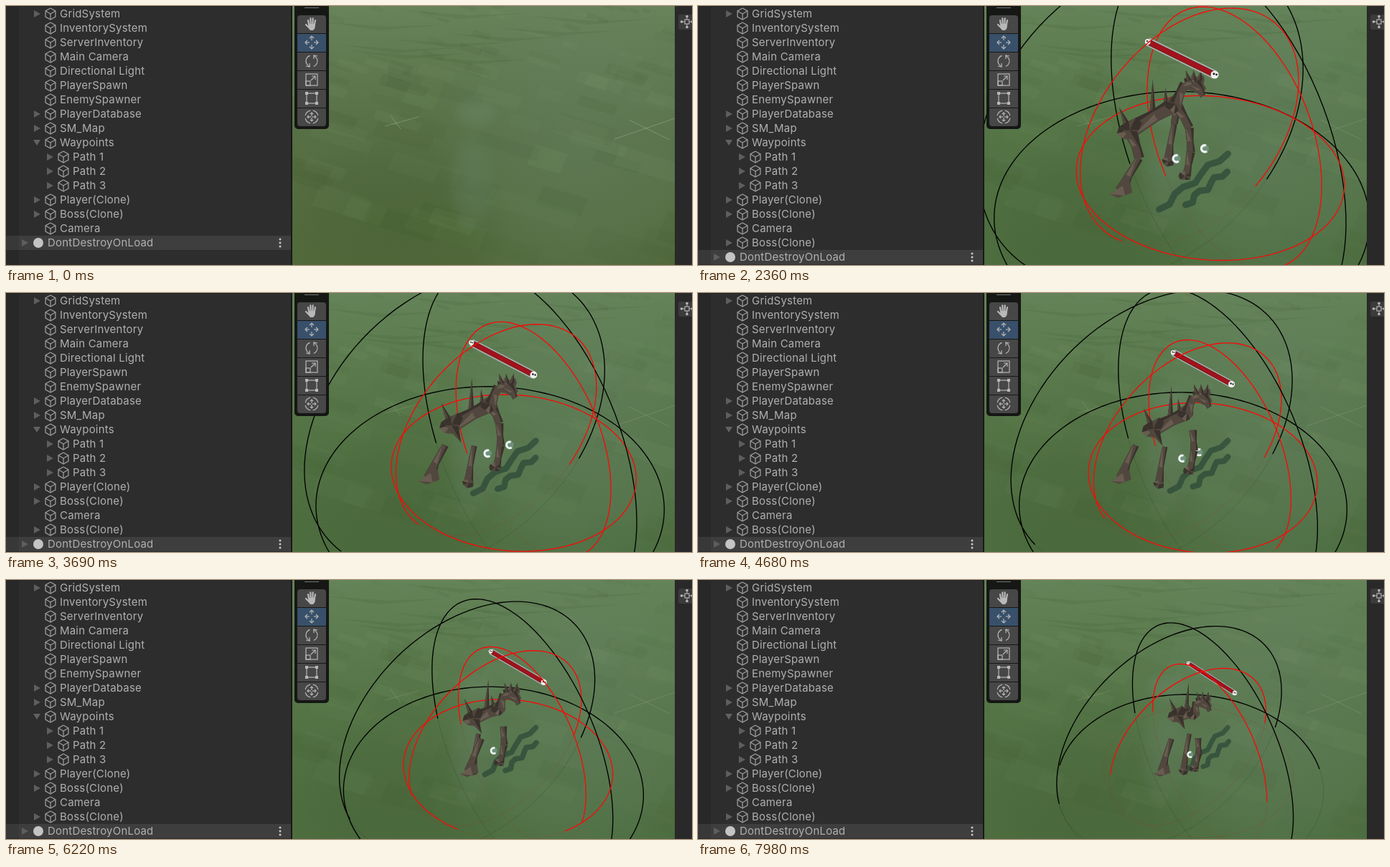
An HTML page with a canvas that plays this animation: 956 px wide and 362 px high, repeating every 8000 ms.

```html
<!DOCTYPE html>
<html lang="en">
<head>
<meta charset="utf-8">
<title>Scene view</title>
<style>
html, body { margin: 0; width: 100%; height: 100%; overflow: hidden; background: #2d2d2d; }
canvas { display: block; width: 956px; height: 362px; }
</style>
</head>
<body>
<canvas id="stage" width="956" height="362"></canvas>
<script>
const W = 956, H = 362, LOOP = 8000, SPAWN = 1460, STEP = 70.2;
const VIEW = { x: 399, w: 533 };
const stage = document.getElementById('stage').getContext('2d');
let g = stage;

// ---------- helpers ----------
function path(pts, close) {
  g.beginPath();
  pts.forEach((p, i) => i ? g.lineTo(p[0], p[1]) : g.moveTo(p[0], p[1]));
  if (close) g.closePath();
}
function poly(color, ...pts) { g.fillStyle = color; path(pts, true); g.fill(); }
function line(color, width, ...pts) {
  g.strokeStyle = color; g.lineWidth = width; path(pts); g.stroke();
}
function box(color, x, y, w, h, r = 0) {
  g.fillStyle = color; g.beginPath(); g.roundRect(x, y, w, h, r); g.fill();
}
function disc(color, x, y, r) {
  g.fillStyle = color; g.beginPath(); g.arc(x, y, r, 0, 7); g.fill();
}
function arc(color, width, x, y, r, a, b) {
  g.strokeStyle = color; g.lineWidth = width;
  g.beginPath(); g.arc(x, y, r, a, b); g.stroke();
}
function layer(draw) {
  const c = document.createElement('canvas');
  c.width = W; c.height = H;
  g = c.getContext('2d');
  draw();
  g = stage;
  return c;
}
function random(seed) {
  return () => (seed = (seed * 16807) % 2147483647) / 2147483647;
}
const mix = (a, b, u) => a + (b - a) * u;
const mid = (a, b, u = 0.5) => [mix(a[0], b[0], u), mix(a[1], b[1], u)];
const off = (p, x, y) => [p[0] + x, p[1] + y];
const smooth = u => (u = Math.min(1, Math.max(0, u))) * u * (3 - 2 * u);

// ---------- terrain ----------
function glow(color, alpha, x, y, rx, ry) {
  g.save();
  g.translate(x, y); g.scale(rx, ry);
  const f = g.createRadialGradient(0, 0, 0, 0, 0, 1);
  f.addColorStop(0, `rgba(${color},${alpha})`);
  f.addColorStop(0.6, `rgba(${color},${alpha * 0.6})`);
  f.addColorStop(1, `rgba(${color},0)`);
  g.fillStyle = f; g.fillRect(-1, -1, 2, 2);
  g.restore();
}
function terrain(lush) {
  const sky = g.createLinearGradient(0, 0, 0, H);
  const tones = lush ? ['#648358', '#547446', '#4e6e40'] : ['#68825a', '#576f44', '#526a3b'];
  tones.forEach((c, i) => sky.addColorStop(i / 2, c));
  g.fillStyle = sky; g.fillRect(VIEW.x, 0, VIEW.w, H);
  glow('105,132,106', 0.42, 800, 190, 210, 230);
  glow('50,75,35', 0.2, 540, 300, 170, 120);
  const rnd = random(77);
  for (let i = 0; i < 120; i++) {
    const y = rnd() * rnd() * 390 - 10, x = VIEW.x - 40 + rnd() * 600;
    const s = 9 + y * 0.15, w = s * (1 + rnd() * 1.8), h = s * (0.35 + rnd() * 0.45);
    const a = (lush ? 0.015 : 0.03) + rnd() * 0.045;
    const tint = rnd() > 0.48 ? `rgba(40,62,28,${a})` : `rgba(150,176,128,${a})`;
    poly(tint, [x, y], [x + w, y + w * 0.3], [x + w - h * 0.45, y + w * 0.3 + h], [x - h * 0.45, y + h]);
  }
  for (let i = 0; i < 9; i++) {
    const y = 6 + i * 8, x = 430 + rnd() * 330;
    poly('rgba(45,70,32,.1)', [x, y], [x + 90, y + 7], [x + 170, y + 4], [x + 80, y + 12]);
  }
  glow('112,140,112', 0.36, 655, 150, 34, 26);
  glow('105,132,105', 0.36, 650, 245, 36, 75);
  const wire = `rgba(175,190,165,${lush ? 0.22 : 0.4})`;
  line(wire, 1, [528, 168], [575, 155]);
  line(wire, 1, [536, 153], [550, 172]);
  line(wire, 1, [848, 186], [932, 157]);
  line(wire, 1, [868, 159], [925, 187]);
}

// ---------- editor panels ----------
const INK = '#b0b0b0', OUTLINE = '#9c9c9c', ICON = '#b8b8b8';
const ROWS = ['>GridSystem', 'InventorySystem', 'ServerInventory', 'Main Camera', 'Directional Light',
  'PlayerSpawn', 'EnemySpawner', '>PlayerDatabase', '>SM_Map', 'vWaypoints', '>>Path 1', '>>Path 2',
  '>>Path 3', '>Player(Clone)', '>Boss(Clone)', 'Camera'];

function fold(x, y, open) {
  if (open) poly('#626262', [x - 5, y - 4], [x + 5, y - 4], [x, y + 4]);
  else poly('#5e5e5e', [x - 4, y - 5], [x + 5, y], [x - 4, y + 5]);
}
function cube(x, y) {
  const hex = i => [x + 8 * Math.sin(i * Math.PI / 3), y - 8 * Math.cos(i * Math.PI / 3)];
  line(OUTLINE, 1.3, ...[0, 1, 2, 3, 4, 5, 6].map(hex));
  for (const i of [1, 3, 5]) line(OUTLINE, 1.3, [x, y], hex(i));
}
function label(text, x, y) {
  g.font = '15px Inter, sans-serif';
  g.letterSpacing = '0.2px';
  g.fillStyle = INK; g.fillText(text, x, y + 5);
}
function hierarchy(spawned) {
  box('#2d2d2d', 0, 0, 397, H);
  box('#282828', 0, 0, 18, H);
  box('#222', 0, 0, 397, 1);
  box('#191919', 397, 0, 2, H);
  const rows = spawned ? [...ROWS, '>Boss(Clone)'] : ROWS;
  rows.forEach((row, i) => {
    const y = 11 + i * 20, name = row.replace(/^[>v]+(?=[A-Z])/, '');
    const dx = row.startsWith('>>') ? 18 : 0;
    if (name !== row) fold(43 + dx, y, row[0] === 'v');
    cube(62 + dx, y);
    label(name, 75 + dx, y);
  });
  const y = 11 + rows.length * 20;
  box('#3e3e3e', 0, y - 10, 397, 20);
  box('#383838', 0, y - 10, 18, 20);
  fold(26, y);
  disc('#c4c4c4', 45, y, 7);
  label('DontDestroyOnLoad', 58, y);
  for (const d of [-5, 0, 5]) disc('#c8c8c8', 382, y + d, 1.5);
}
function arrows(x, y, r, head, gap) {
  for (const [a, b] of [[1, 0], [-1, 0], [0, 1], [0, -1]]) {
    const at = (u, v) => [x + a * u - b * v, y + b * u + a * v];
    line(ICON, 1.2, at(gap, 0), at(r, 0));
    line(ICON, 1.2, at(r - head, -head), at(r, 0), at(r - head, head));
  }
}
function hand(x, y) {
  g.lineCap = 'round';
  for (const a of [-5, -1.7, 1.7, 5])
    line(ICON, 2.2, [x + a, y - 9 + Math.abs(a) * 0.8], [x + a * 0.7, y + 3]);
  line(ICON, 2.2, [x - 8, y + 1], [x - 3, y + 6]);
  g.lineCap = 'butt';
  poly(ICON, [x - 4, y], [x + 5, y], [x + 4.5, y + 6], [x + 2, y + 9], [x - 2, y + 9], [x - 5, y + 5]);
}
function toolbar() {
  box('rgba(18,18,18,.95)', 402, -8, 48, 180, 5);
  box('#777', 416, 2, 20, 1);
  for (let i = 0; i < 6; i++) {
    const r = i === 0 ? [4, 4, 0, 0] : i === 5 ? [0, 0, 4, 4] : 0;
    box(i === 1 ? '#38506a' : '#474747', 406, 13 + i * 26, 40, 25, r);
  }
  const x = 426;
  hand(x, 25);
  arrows(x, 51, 9, 3, 3);
  arc(ICON, 1.2, x, 77, 8, 1.9, 4.4);
  arc(ICON, 1.2, x, 77, 8, 5.05, 7.5);
  line(ICON, 1.2, [x - 8, 84], [x - 3, 85], [x - 3, 80]);
  line(ICON, 1.2, [x + 8, 70], [x + 3, 69], [x + 3, 74]);
  g.strokeRect(x - 8, 95, 16, 16);
  g.strokeRect(x - 8, 105, 6, 6);
  line(ICON, 1.2, [x - 1, 104], [x + 5, 98]);
  line(ICON, 1.2, [x, 98], [x + 5, 98], [x + 5, 103]);
  g.strokeRect(x - 7, 122, 14, 14);
  for (const a of [-7, 7]) for (const b of [122, 136]) box(ICON, x + a - 2, b - 2, 4, 4);
  for (let i = 0; i < 4; i++) arc(ICON, 1.2, x, 155, 9, i * 1.571 + 0.2, i * 1.571 + 1.37);
  arrows(x, 155, 6, 2, 1);
}
function sidebar() {
  const x = 949, y = 22;
  box('#292929', 932, 0, 24, H);
  box('#3b3b3b', 937, 12, 19, 21, [3, 0, 0, 3]);
  g.strokeStyle = ICON; g.lineWidth = 1.1;
  g.strokeRect(x - 3, y - 3, 6, 6);
  for (const [a, b] of [[1, 0], [-1, 0], [0, 1], [0, -1]]) {
    line(ICON, 1, [x + 3 * a, y + 3 * b], [x + 7 * a, y + 7 * b]);
    disc(ICON, x + 7.5 * a, y + 7.5 * b, 1.8);
  }
}
function backdrop(spawned) {
  return layer(() => { terrain(spawned); hierarchy(spawned); sidebar(); });
}

// ---------- wire spheres ----------
const FOCAL = 408, EYE = [665.5, 234];
const TILT = 40 * Math.PI / 180, TURN = 58 * Math.PI / 180;
const CT = Math.cos(TILT), ST = Math.sin(TILT), CY = Math.cos(TURN), SY = Math.sin(TURN);
// circle axes as [right, up, forward]
const CIRCLES = [[[1, 0, 0], [0, 0, 1]], [[-CY, 0, SY], [0, 1, 0]], [[SY, 0, CY], [0, 1, 0]]];

// u runs 0..1 as the creature sinks away from the camera
const outer = u => ({
  x: 7 + 11 * u * u, y: -13.6 + 46 * u - 18 * u * u,
  size: 234 - 58.5 * u, lift: 0.43 - 0.42 * u });
const inner = u => ({
  x: 43 - 24 * u + 11 * u * u, y: -30.6 + 72 * u - 28 * u * u,
  size: 175 - 60 * u + 13 * u * u, lift: 0.65 - 0.8 * u });

function sphere({ x, y, size, lift }, far, color, faint) {
  const k = size / FOCAL, N = 150;
  const seen = new Path2D(), buried = new Path2D();
  for (const [a, b] of CIRCLES) {
    let last = null;
    for (let i = 0; i <= N; i++) {
      const q = i / N * 2 * Math.PI, c = Math.cos(q), s = Math.sin(q);
      const [right, up, fwd] = a.map((n, j) => n * c + b[j] * s);
      const depth = CT * fwd - ST * up, w = 1 + k * depth;
      const p = [EYE[0] + (x + size * right) / w, EYE[1] + (y - size * (CT * up + ST * fwd)) / w];
      if (last && depth > 0 === far) {
        const out = up + lift + 0.12 * fwd > 0 ? seen : buried;
        out.moveTo(last[0], last[1]); out.lineTo(p[0], p[1]);
      }
      last = p;
    }
  }
  g.lineCap = 'round';
  g.lineWidth = 1; g.strokeStyle = faint; g.stroke(buried);
  g.lineWidth = 1.35; g.strokeStyle = color; g.stroke(seen);
  g.lineCap = 'butt';
}
function spheres(u, far) {
  sphere(outer(u), far, '#000', 'rgba(25,40,25,.16)');
  sphere(inner(u), far, '#f80a08', 'rgba(150,60,45,.22)');
}

// ---------- creature ----------
const BONE = '#51473e', DARK = '#39312b', PALE = '#685c50';
function limb(a, b, wa, wb) {
  const len = Math.hypot(b[0] - a[0], b[1] - a[1]) || 1;
  const nx = (b[1] - a[1]) / len, ny = (a[0] - b[0]) / len;
  const side = (p, w) => off(p, nx * w, ny * w);
  const knot = mid(a, b, 0.55);
  poly(DARK, side(a, wa), side(knot, wa * 0.75), side(b, wb), side(b, -wb), side(knot, -wb * 0.8), side(a, -wa));
  poly(BONE, side(a, -wa), side(a, wa * 0.3), side(knot, wa * 0.5), side(b, wb * 0.5), side(b, -wb), side(knot, -wb * 0.8));
  poly(PALE, side(a, -wa * 0.8), side(knot, -wb * 0.6), side(knot, wa * 0.2));
}
function spike(base, tip, w) {
  poly(DARK, off(base, -w, 0), tip, off(base, w, 2));
  poly(BONE, off(base, -w, 0), tip, off(base, 0, 1));
}
// jagged faceted lump
function lump(p, rx, ry, seed, n = 11) {
  const rnd = random(seed), rim = [];
  for (let i = 0; i < n; i++) {
    const r = 0.72 + 0.5 * rnd(), a = i / n * 2 * Math.PI;
    rim.push(off(p, rx * r * Math.cos(a), ry * r * Math.sin(a)));
  }
  rim.forEach((q, i) => poly([BONE, DARK, PALE, BONE, DARK][Math.floor(rnd() * 5)], p, q, rim[(i + 1) % n]));
}
function shadow(u, s) {
  const from = [643 + 36 * u, 284 - 18 * u], end = [737, 205];
  const ink = new Path2D();
  for (const shift of [0, 1]) {
    for (let i = 0; i <= 8; i++) {
      const p = mid(from, end, shift * 0.22 + i / 8 * (1 - shift * 0.4));
      const wave = Math.sin(i * 1.9) * 3 * s;
      ink[i ? 'lineTo' : 'moveTo'](p[0] + wave + shift * 16 * s, p[1] + wave + shift * 11 * s);
    }
  }
  g.strokeStyle = 'rgba(34,62,50,.6)'; g.lineWidth = 9 * s;
  g.lineCap = g.lineJoin = 'round';
  g.stroke(ink);
  g.lineCap = 'butt'; g.lineJoin = 'miter';
}
function orb(x, y, r) {
  disc('rgba(140,185,190,.4)', x, y, r * 0.9);
  arc('#eef4f2', r * 0.5, x, y, r * 0.72, 0.9, 5.1);
}
function creature(u) {
  const s = outer(u).size / 234;
  const chest = [666 + 46 * u - 20 * u * u, 138 + 88 * u - 40 * u * u];
  const head = off(chest, 26 - 14 * u, -30 + 13 * u);
  const hip = off(chest, -63 + 39 * u, 36 - 33 * u);
  const back = mid(hip, chest);
  const turn = smooth((u - 0.4) / 0.3);
  const hind = [590 + 57 * turn, 259 + 9 * turn];
  const near = [655 - 66 * u + 88 * u * u, 217 + 50 * smooth(u / 0.25)];
  const front = [681 + 12 * u, 238 + 26 * u];
  const hindTop = off(hind, 25 - 12 * u, -46), nearTop = off(near, 8, -52);
  const frontTop = off(front, 4, -67 + 24 * u);

  shadow(u, s);
  if (u < 0.5) orb(706 - 18 * u, 200 + 55 * u, 6.5 * s);
  limb(nearTop, near, 4 * s, 7 * s);
  lump(near, 10 * s, 7 * s, 5, 7);
  if (u < 0.12) {
    limb(hip, hindTop, 10, 7);
    limb(chest, nearTop, 8, 5);
  }
  if (u < 0.33) limb(chest, frontTop, 9 * s, 6 * s);

  limb(hindTop, hind, 5 * s, 9 * s);
  poly(BONE, off(hind, 12 * s, -14 * s), off(hind, 15 * s, 2 * s), off(hind, -4 * s, 9 * s), off(hind, -16 * s, 4 * s));
  poly(PALE, off(hind, 2 * s, -8 * s), off(hind, 5 * s, 6 * s), off(hind, -16 * s, 4 * s));
  const knee = off(mid(frontTop, front, 0.5), 4 * s, 0);
  limb(frontTop, knee, 6 * s, 6 * s);
  limb(knee, front, 6 * s, 6 * s);
  lump(off(front, -2 * s, 0), 10 * s, 7 * s, 12, 8);

  spike(back, off(back, 4 * u, -52 + 8 * u), 5 * s);
  spike(hip, off(hip, -15 * s, -32 * s), 7 * s);
  spike(mid(hip, chest, 0.8), off(chest, -14 * s, -22 * s), 5 * s);
  limb(hip, chest, 12 * s, 11 * s);
  lump(hip, 17 * s, 16 * s, 31);
  lump(chest, 14 * s, 13 * s, 8);
  spike(hip, off(hip, 14 * s, 26 * s), 10 * s);
  const nape = off(head, -13 * s, 2 * s);
  limb(chest, nape, 9 * s, 7 * s);
  limb(nape, head, 8 * s, 9 * s);
  lump(off(head, 2 * s, 2 * s), 15 * s, 13 * s, 21, 13);
  limb(head, off(head, 12 * s, 19 * s), 9 * s, 4 * s);
  for (let i = 0; i < 3; i++) {
    const root = off(head, (i * 7 - 7) * s, -4 * s);
    spike(root, off(root, (i * 4 - 5) * s, -13 * s), 4 * s);
  }
  orb(667 + 19 * u, 214 + 50 * u - 20 * u * u, 6.5 * s);
}
function healthBar(u) {
  const centre = [674.5 + 88 * u - 47 * u * u, 74 + 85 * u - 22 * u * u];
  const hx = 46.5 - 14 * u, hy = 23 - 2 * u, w = 12 - 5 * u;
  const a = off(centre, -hx, -hy), b = off(centre, hx, hy);
  line('#a9adab', w, a, b);
  line('#5d1418', w * 0.68, mid(a, b, 0.03), mid(a, b, 0.97));
  line('#a3121a', w * 0.55, mid(a, b, 0.04), mid(a, b, 0.95));
  const cap = (p, r) => {
    disc('#f1f1ee', p[0], p[1], r);
    disc('#222', p[0] - r * 0.2, p[1] - r * 0.2, r * 0.28);
    disc('#222', p[0] + r * 0.45, p[1], r * 0.25);
  };
  cap(a, w * 0.32); cap(b, w * 0.46);
}

// ---------- playback ----------
const EMPTY = backdrop(false), ACTIVE = backdrop(true), TOOLS = layer(toolbar);

function hold(t) {
  if (t < 1530) return 1660;
  if (t < 1800) return 1730;
  return 1800 + Math.floor((t - 1800) / STEP) * STEP;
}
function render(t) {
  const spawned = t >= SPAWN;
  g.drawImage(spawned ? ACTIVE : EMPTY, 0, 0);
  if (spawned) {
    const u = (hold(t) - 2360) / 5620;
    g.save();
    g.beginPath(); g.rect(VIEW.x, 0, VIEW.w, H); g.clip();
    spheres(u, true);
    creature(u);
    healthBar(u);
    spheres(u, false);
    g.restore();
  }
  g.drawImage(TOOLS, 0, 0);
}
const start = performance.now();
function tick() {
  render((performance.now() - start) % LOOP);
  requestAnimationFrame(tick);
}
tick();
</script>
</body>
</html>
```
